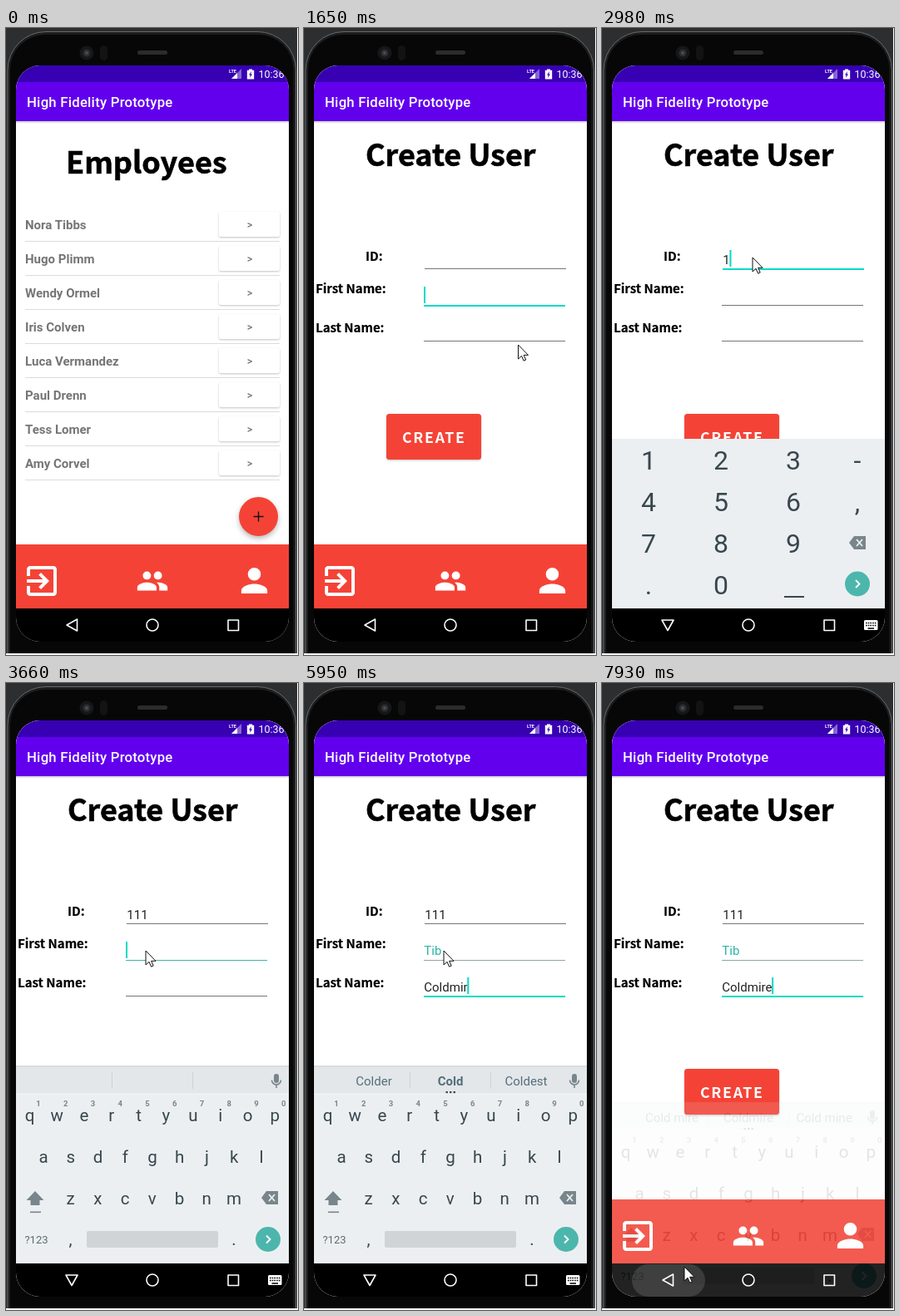
An HTML page for the animation above (8 s loop, 351x754 px).

```html
<!DOCTYPE html>
<html lang="en">
<head>
<meta charset="utf-8">
<title>High Fidelity Prototype</title>
<style>
html, body { margin: 0; width: 100%; height: 100%; overflow: hidden; background: #2c2e30; }
svg { display: block; width: 100vw; height: 100vh; font-family: Roboto, sans-serif; }
.bar { font-weight: 500; font-size: 16.7px; letter-spacing: .25px; fill: #fff; }
.head, .label, .action { font-family: "Noto Sans CJK JP", "Noto Sans CJK SC", "Noto Sans CJK", "Noto Sans", sans-serif; font-weight: 700; }
.head { font-size: 36px; stroke: #000; stroke-width: .6px; }
.label { font-size: 15px; stroke: #000; stroke-width: .2px; }
.action { font-size: 17.7px; letter-spacing: 1.7px; fill: #fff; }
.name { font-weight: 700; font-size: 15px; fill: #757575; }
.raised { filter: drop-shadow(0 1.3px 1.2px rgba(0,0,0,.24)); }
.high { filter: drop-shadow(0 3px 3px rgba(0,0,0,.28)); }
.value { font-size: 15px; fill: #212121; }
.mid { text-anchor: middle; }
.key { font-size: 20.5px; fill: #37474f; text-anchor: middle; }
.digit { font-size: 32px; }
.hint { font-size: 9.5px; font-weight: 700; fill: #78868c; text-anchor: middle; }
.pick { font-size: 15px; fill: #546e7a; text-anchor: middle; }
</style>
</head>
<body>
<svg id="stage" viewBox="0 0 351 754" preserveAspectRatio="none"></svg>
<script>
const LOOP = 8000;
const RED = '#f44336', TEAL = '#03dac5', KEY = '#37474f', GREY = '#78868c';

const rect = (x, y, w, h, fill, more = '') =>
  `<rect x="${x}" y="${y}" width="${w}" height="${h}" fill="${fill}" ${more}/>`;
const text = (x, y, cls, str, more = '') => `<text x="${x}" y="${y}" class="${cls}" ${more}>${str}</text>`;
const path = (d, more) => `<path d="${d}" ${more}/>`;
const icon = (cx, cy, scale, d) =>
  path(d, `fill="#fff" transform="translate(${cx - 12 * scale} ${cy - 12 * scale}) scale(${scale})"`);

const EXIT = 'M10.09 15.59L11.5 17l5-5-5-5-1.41 1.41L12.67 11H3v2h9.67zM19 3H5c-1.1 0-2 .9-2 2v4h2V5h14v14H5v-4H3v4c0 1.1.9 2 2 2h14c1.1 0 2-.9 2-2V5c0-1.1-.9-2-2-2z';
const GROUP = 'M16 11a3 3 0 1 0 0-6 3 3 0 0 0 0 6zM8 11a3 3 0 1 0 0-6 3 3 0 0 0 0 6zm0 2c-2.33 0-7 1.17-7 3.5V19h14v-2.5c0-2.33-4.67-3.5-7-3.5zm8 0l-.97.05c1.16.84 1.97 1.97 1.97 3.45V19h6v-2.5c0-2.33-4.67-3.5-7-3.5z';
const PERSON = 'M12 12a4 4 0 1 0 0-8 4 4 0 0 0 0 8zm0 2c-2.67 0-8 1.34-8 4v2h16v-2c0-2.66-5.33-4-8-4z';

// One app window: bars around the given content
const appWindow = (id, content) => `<g id="${id}">
  ${rect(12, 45, 328, 693, '#fff')}${rect(12, 111, 328, 4, 'url(#shade)')}
  ${rect(12, 45, 328, 20, '#3700b3')}${rect(12, 65, 328, 47, '#6200ee')}
  ${text(25, 95, 'bar', 'High Fidelity Prototype')}
  ${content}
  ${rect(12, 621, 328, 77, RED)}
  ${icon(43, 665, 2, EXIT)}${icon(176, 665, 1.65, GROUP)}${icon(298.5, 664.5, 1.95, PERSON)}
  ${rect(12, 698, 328, 40, '#000')}</g>`;

const people = ['Nora Tibbs', 'Hugo Plimm', 'Wendy Ormel', 'Iris Colven',
  'Luca Vermandez', 'Paul Drenn', 'Tess Lomer', 'Amy Corvel'];
const listContent = text(72, 174.5, 'head', 'Employees') +
  people.map((name, i) => {
    const y = 236 + 41 * i;
    return text(23, y + 5.5, 'name', name) +
      rect(256, y - 15, 73, 30, '#fff', 'rx="2.5" class="raised"') +
      text(293, y + 5, 'mid', '&gt;', 'font-size="12.5" font-weight="500" fill="#757575"') +
      rect(23, y + 20, 306, 1, '#dcdcdc');
  }).join('') +
  `<circle cx="303.5" cy="587.5" r="23.5" fill="${RED}" class="high"/>
   <circle id="ripple" cx="303.5" cy="587.5" r="0" fill="#000"/>` +
  path('M297.5 587.5h12M303.5 581.5v12', 'stroke="#111" stroke-width="1.4"');

const fields = [
  { label: 'ID:', labelX: 74, labelY: 279.5, x: 145, lineY: 289, baseY: 283.5 },
  { label: 'First Name:', labelX: 14, labelY: 319, x: 144, lineY: 333, baseY: 327 },
  { label: 'Last Name:', labelX: 14, labelY: 365.5, x: 144, lineY: 376, baseY: 370.5 }
];
const formContent = text(74, 166, 'head', 'Create User') +
  fields.map((f, i) => text(f.labelX, f.labelY, 'label', f.label) +
    rect(f.x, f.lineY, 170, 1, '#757575', `id="line${i}"`) +
    text(f.x + .3, f.baseY, 'value', '', `id="value${i}"`)).join('') +
  rect(144, 0, 2, 20, TEAL, 'id="caret"') + rect(144, 372, 0, 1, '#212121', 'id="underline"') +
  rect(99, 464, 114, 55, RED, 'rx="3.5" class="raised"') + text(118, 499, 'action', 'CREATE');

const backspace = (x, y) =>
  path(`M${x - 10} ${y}l6-8h14v16h-14z`, `fill="${GREY}"`) +
  path(`M${x - 1} ${y - 4}l7 8m0-8l-7 8`, 'stroke="#eceff1" stroke-width="1.8"');
const done = (x, y) => `<circle cx="${x}" cy="${y}" r="15" fill="#4db6ac"/>` +
  path(`M${x - 2} ${y - 4.5}l4.5 4.5-4.5 4.5`, 'fill="none" stroke="#fff" stroke-width="1.8"');
const letters = (row, x, y) => [...row].map((c, i) => text(x + 32.75 * i, y, 'key', c)).join('');

const numberPad = `<g id="numberPad">${rect(12, 494, 328, 204, '#eceff1')}
  ${['123-', '456,', '789', '.0'].map((row, r) => [...row].map((c, i) =>
    text([56, 143, 230, 307][i], 531 + 50 * r, 'key digit', c)).join('')).join('')}
  ${rect(219, 683, 24, 2, KEY)}${backspace(307, 619)}${done(307, 668.5)}</g>`;

const letterPad = `<g id="letterPad">${rect(12, 461, 328, 237, '#eceff1')}
  ${rect(12, 461, 328, 33, '#e3e7ea')}${rect(12, 460, 328, 1.5, '#d6dadd')}${rect(12, 493.5, 328, 1, '#f5f7f8')}
  ${rect(127, 468, 1, 20, '#cdd2d5')}${rect(224, 468, 1, 20, '#cdd2d5')}
  ${[84, 176, 267].map((x, i) => text(x, 484, 'pick', '', `id="pick${i}"`)).join('')}
  <g id="dots">${[170.5, 175, 179.5].map(x => rect(x, 491, 2.4, 2.2, KEY)).join('')}</g>
  ${rect(322, 470, 6, 11, GREY, 'rx="3"')}
  ${path('M319.5 477.5a5.5 5.5 0 0 0 11 0M325 483v4', `fill="none" stroke="${GREY}" stroke-width="1.6"`)}
  ${[...'1234567890'].map((c, i) => text(39 + 32.75 * i, 508.5, 'hint', c)).join('')}
  ${letters('qwertyuiop', 28.5, 526.5)}${letters('asdfghjkl', 45, 576.5)}${letters('zxcvbnm', 77.5, 626.5)}
  ${path('M35 611l10.5 11h-5v6h-11v-6h-5z', `fill="${GREY}"`)}${rect(29, 635.5, 13, 1.6, GREY)}
  ${backspace(317, 619)}
  ${text(36.5, 674, 'mid', '?123', 'font-size="13" fill="#5c6b72"')}
  ${text(77.5, 676, 'key', ',')}${text(274, 676, 'key', '.')}
  ${rect(97, 659, 158, 20, '#d0d4d6', 'rx="2"')}${done(315, 669)}</g>`;

const stroke = 'fill="none" stroke="#fff" stroke-width="1.6" stroke-linejoin="round"';
const system = text(268, 53.5, '', 'LTE', 'font-size="5.5" font-weight="700" fill="#fff"') +
  path('M283 49v12h-12z', 'fill="#fff" opacity=".4"') + path('M278 54v7h-7z', 'fill="#fff"') +
  path('M292 49.5h4v1.2h2.2v10.8h-8.4V50.7h2.2z', 'fill="#fff"') +
  path('M295 52l-3 4.5h1.7l-.7 3.5 3-4.5h-1.7z', 'fill="#3700b3"') +
  text(303.5, 59.5, '', '10:36', 'font-size="12.4" fill="#fff"') +
  rect(36, 699, 88, 39, '#fff', 'rx="19.5" id="press" opacity=".13"') +
  path('M73 718l12.5-7v14z', `id="back" ${stroke}`) + path('M72 712h14l-7 12.5z', `id="hide" ${stroke}`) +
  `<circle cx="176" cy="718" r="7" ${stroke}/>` + rect(267, 712, 12.5, 12.5, 'none', stroke) +
  `<g id="kbdIcon">${rect(315, 712, 16.5, 12, '#fff', 'rx="1.5"')}` +
  path('M317 715.5h12.5M317 718.5h12.5', 'stroke="#000" stroke-width="1.6" stroke-dasharray="1.6 1.1"') +
  path('M319.5 722h7.5', 'stroke="#000" stroke-width="1.4"') + '</g>';

const phone = rect(2, 4.5, 346.5, 800, '#1c1d1e', 'rx="46" stroke="#686a6c"') +
  rect(5, 8, 340.5, 800, '#070707', 'rx="42"') +
  `<circle cx="97" cy="30" r="8.5" fill="#161718"/><circle cx="97" cy="30" r="4.5" fill="#2b2d30"/>
   <circle cx="97" cy="30" r="2" fill="#4a4d50"/>` +
  rect(113, 21, 9, 18, '#131314', 'rx="4.5"') + rect(158, 27, 36, 5, '#2b2c2d', 'rx="2.5"');

document.getElementById('stage').innerHTML = `<defs>
  <clipPath id="screen">${rect(12, 45, 328, 693, '#000', 'rx="29"')}</clipPath>
  <linearGradient id="shade" x2="0" y2="1"><stop stop-opacity=".28"/><stop offset="1" stop-opacity="0"/></linearGradient></defs>
  ${rect(0, 0, 351, 754, '#2c2e30')}${phone}
  <g clip-path="url(#screen)">${appWindow('list', listContent)}${rect(12, 45, 328, 693, '#000', 'id="dim" opacity=".08"')}
  ${appWindow('form', formContent)}<g id="keyboard">${numberPad}${letterPad}</g>${system}</g>
  ${path('M0 0V17L4 13.3 6.6 19.2 9.2 18 6.6 12.3H12Z', 'id="pointer" fill="#fff" stroke="#111" stroke-width="1"')}
  ${path('M350 0h1v754H0v-2h350z', 'fill="#fff"')}`;

const el = {};
document.querySelectorAll('[id]').forEach(node => el[node.id] = node);

const clamp = v => Math.max(0, Math.min(1, v));
const progress = (t, from, to) => clamp((t - from) / (to - from));
const show = (node, on) => node.setAttribute('visibility', on ? 'inherit' : 'hidden');
const set = (node, attrs) => { for (const k in attrs) node.setAttribute(k, attrs[k]); };
const latest = (steps, t) => steps.reduce((value, [time, next]) => t >= time ? next : value, steps[0][1]);

// Typing: times at which each further character appears
const typed = [
  ['111', [2950, 3140, 3330]],
  ['Tib', [3930, 4260, 4400]],
  ['Coldmire', [5140, 5280, 5400, 5540, 5680, 5820, 5950, 6080]]
];
const focusSteps = [[0, 1], [1930, 0], [3660, 1], [4740, 2]];
const pickSteps = [
  [0, []], [4060, ['The', 'T', 'This']], [4330, ['Time', 'Ti', 'Tiny']], [4530, ['Tip', 'Tib', 'Tin']], [4740, []],
  [5210, ['Can', 'C', 'Come']], [5330, ['Come', 'Co', 'Could']], [5610, ['Colder', 'Cold', 'Coldest']],
  [6220, ['Cold mire', 'Coldmire', 'Cold mine']]
];
const pointerPath = [
  [330, 308, 630], [620, 304, 577], [1200, 304, 577], [1930, 235, 286], [2350, 181, 276], [3390, 181, 276],
  [3660, 168, 322], [6690, 168, 322], [7110, 67, 728], [7460, 99, 702], [LOOP, 99, 702]
];

function drawPointer(t) {
  show(el.pointer, t >= 330);
  const i = Math.max(1, pointerPath.findIndex(p => p[0] > t));
  const [t0, x0, y0] = pointerPath[i - 1], [t1, x1, y1] = pointerPath[i];
  const p = progress(t, t0, t1), e = p * p * (3 - 2 * p);
  set(el.pointer, { transform: `translate(${x0 + (x1 - x0) * e} ${y0 + (y1 - y0) * e})` });
}

function drawForm(t) {
  const focus = latest(focusSteps, t);
  fields.forEach((f, i) => {
    const [word, times] = typed[i];
    el['value' + i].textContent = word.slice(0, times.filter(time => t >= time).length);
    const active = i === focus, thin = active && i === 1 && t > 3000;
    set(el['line' + i], {
      fill: thin ? '#3fb5a8' : active ? TEAL : i === 1 && t > 4000 ? '#8fa5a3' : '#757575',
      height: active && !thin ? 2 : 1
    });
  });
  el.value1.style.fill = '#2bb5a6';
  const width = el['value' + focus].getComputedTextLength();
  set(el.caret, { x: fields[focus].x + width, y: fields[focus].lineY - 22 });
  show(el.caret, t < 6830 || t >= 7330);
  set(el.underline, { width: t >= 6220 && t < 7790 ? width : 0 });
}

function drawKeyboard(t) {
  const open = t >= 2550, closing = t >= 7790;
  const rise = progress(t, 2550, 2750), fall = progress(t, 7720, 7930);
  show(el.keyboard, open);
  show(el.numberPad, open && t < 3660);
  show(el.letterPad, t >= 3660);
  set(el.keyboard, {
    transform: `translate(0 ${closing ? 44 * fall : 64 * (1 - rise) ** 2})`,
    opacity: closing ? 1 - .86 * fall : clamp(.3 + rise)
  });
  const picks = latest(pickSteps, t);
  for (let i = 0; i < 3; i++) el['pick' + i].textContent = picks[i] || '';
  el.pick1.style.fontWeight = t < 6220 ? 700 : 400;
  show(el.dots, picks.length);
  show(el.hide, open && !closing);
  show(el.kbdIcon, open && !closing);
  show(el.back, !open || closing);
  show(el.press, closing);
}

function draw(t) {
  const enter = progress(t, 1170, 1400);
  show(el.form, t >= 1170);
  show(el.dim, t >= 1170);
  set(el.form, { transform: `translate(0 ${19 * (1 - enter) ** 2})`, opacity: .82 + .18 * enter });
  const press = progress(t, 800, 1050);
  set(el.ripple, { r: 23.5 * press, opacity: .38 * press });
  drawForm(t);
  drawKeyboard(t);
  drawPointer(t);
}

const start = performance.now();
function tick() {
  draw((performance.now() - start) % LOOP);
  requestAnimationFrame(tick);
}
tick();
</script>
</body>
</html>
```
